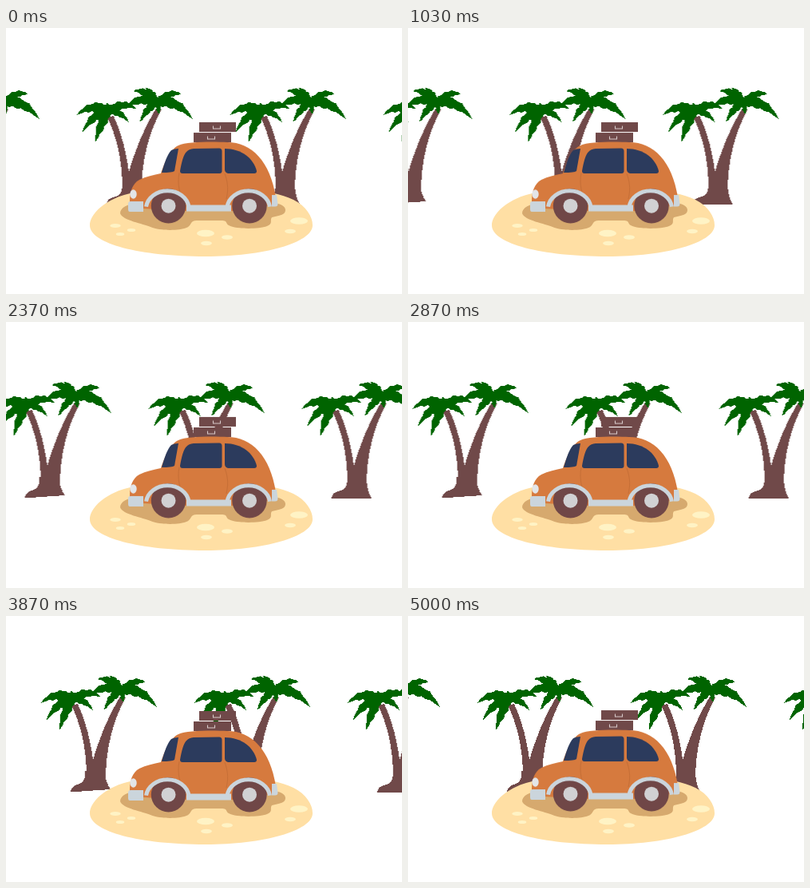
Recreate the animation shown at these times as an HTML page. Size 496 by 333 pixels, loop 5030 ms.

```html
<!DOCTYPE html>
<html lang="en">
<head>
<meta charset="utf-8">
<title>Beach trip</title>
<style>
  html, body { margin: 0; width: 100%; height: 100%; overflow: hidden; background: #fff; }
  svg { display: block; width: 496px; height: 333px; }
  .grove { animation: drift 5030ms linear infinite; shape-rendering: crispEdges; }
  .car { animation: bob 251.5ms cubic-bezier(.37, 0, .63, 1) infinite alternate; }
  .trunk, .case { fill: #704949; }
  .case { shape-rendering: crispEdges; }
  .leaf { fill: #006400; }
  .spot { fill: #fff3c5; }
  .glass { fill: #2c3b5d; }
  .trim { fill: #cbd5dc; }
  .arch { fill: none; stroke: #cbd5dc; stroke-width: 5; }
  .seam { fill: none; stroke: #c66f37; }
  .clasp { fill: none; stroke: #d8caca; stroke-width: 1.1; }
  @keyframes drift { to { transform: translateX(192px); } }
  @keyframes bob { to { transform: translateY(1.5px); } }
</style>
</head>
<body>
<svg viewBox="0 0 496 333">
  <defs>
    <g id="pair">
      <g class="trunk">
        <path d="M38 112C49 133 57 165 57 200H66V186C63 160 56 130 46 110Z"/>
        <path d="M99 101C84 125 72 155 63 187V206H81C81 165 90 132 106 102Z"/>
      </g>
      <path id="crowns" class="leaf"/>
    </g>
    <path id="base" class="trunk" d="M57 196C57 209 50 211 45 212Q38 214 37 220.500H87C83 213 81 205 81 192H64Z"/>
    <ellipse id="pebble" class="spot" rx="11" ry="4.300"/>
    <g id="wheel">
      <circle r="21.700" fill="#704747"/>
      <circle r="9" fill="#d1d1d3"/>
      <path class="arch" d="M-28 1A27 23 0 0 1 25.500 1"/>
    </g>
  </defs>

  <g class="grove" id="grove"></g>

  <path fill="#ffdfa4" d="M105 247C105 235 118 222 135 214C150 206 175 203 200 203H300C325 203 345 208 360 215C376 223 384 236 384 247C384 269 322 286 250 286C168 286 105 270 105 247Z"/>
  <path fill="#d6a96e" d="M143 232C143 225 152 220 166 219H335C346 220 350 224 350 228C350 234 342 235 333 237C330 241 335 245 327 248C316 252 288 252 279 247C274 244 279 241 268 241H240C229 241 234 247 226 250C216 254 193 254 181 249C172 245 146 241 143 232Z"/>
  <use href="#pebble" transform="translate(250 257)"/>
  <use href="#pebble" transform="translate(367 241.500)"/>
  <use href="#pebble" transform="translate(277 262) scale(.64)"/>
  <use href="#pebble" transform="translate(251 269.500) scale(.62)"/>
  <use href="#pebble" transform="translate(356 254.500) scale(.62)"/>
  <use href="#pebble" transform="translate(137 247.500) scale(.6)"/>
  <use href="#pebble" transform="translate(157 253) scale(.48)"/>
  <use href="#pebble" transform="translate(143 258) scale(.48)"/>

  <g class="car">
    <rect class="case" x="242" y="118" width="46" height="12"/>
    <rect class="case" x="235" y="131" width="47" height="12"/>
    <path class="clasp" d="M259.500 122.500V126H268.500V122.500M252.500 135.500V139H261.500V135.500"/>

    <path fill="#d67a3e" d="M155 218C155 205 158 195 167 190C175 186 185 184 194 182C199 168 205 152 216 147C226 142 260 142 277 143C308 143 331 167 338 212V223H326L284 229H226L172 226H155Z"/>
    <path class="seam" d="M217 181C214 196 218 210 224 217M274 182C279 196 278 204 276 214"/>
    <path class="glass" d="M195 181C198 170 202 158 207 153Q211 151 216 151L211 179Q208 181 195 181Z"/>
    <path class="glass" d="M218 179C220 168 222 159 226 155Q229 151.500 235 151L267 150.500Q270.500 150.500 270.500 154V179Q270.500 182 267.500 182H221Q218 182 218 179Z"/>
    <path class="glass" d="M274 151C295 151 310 163 314 179Q314 182 311 182H278Q274 181 274 177Z"/>

    <path class="trim" d="M226 221.500H282V229.500H226Z"/>
    <path class="trim" d="M156 217H172V230H155Q153 230 153 227V220Q153 217 156 217Z"/>
    <path class="trim" d="M333 209H339L340.500 220Q340.500 223.500 337 223.500H333Z"/>
    <ellipse cx="159.500" cy="208" rx="4.200" ry="5.800" fill="#e3e5e8"/>
    <use href="#wheel" x="203.500" y="222.700"/>
    <use href="#wheel" x="305" y="222.700"/>
  </g>
</svg>
<script>
  const TEETH = 8, GAP = 192;

  // A toothed leaf from the hub to a tip, arched upwards by its reach
  function frond(hub, dx, dy) {
    const bend = { x: dx * 0.55, y: dy / 2 - Math.abs(dx) / 3 };
    const width = 4 + Math.hypot(dx, dy) * 0.18;
    const edge = side => Array.from({ length: TEETH }, (_, i) => {
      const t = i / TEETH, u = 1 - t;
      const x = hub.x + 2 * u * t * bend.x + t * t * dx;
      const y = hub.y + 2 * u * t * bend.y + t * t * dy;
      const angle = Math.atan2(u * bend.y + t * (dy - bend.y), u * bend.x + t * (dx - bend.x));
      const tooth = i % 2 ? 1.15 : 0.8;
      const reach = side * width / 2 * tooth * Math.sin(Math.PI * (0.25 + 0.75 * t));
      return `${x - Math.sin(angle) * reach} ${y + Math.cos(angle) * reach}`;
    });
    const tip = `${hub.x + dx} ${hub.y + dy}`;
    return "M" + [...edge(1), tip, ...edge(-1).reverse()].join("L") + "Z";
  }

  const crown = (x, y, tips) => tips.map(([dx, dy]) => frond({ x, y }, dx, dy)).join("");

  document.getElementById("crowns").setAttribute("d",
    crown(39, 104, [[-39, 5], [-32, 26], [-16, 39], [-24, -6], [-1, -11], [26, 14], [35, -3]]) +
    crown(101, 93, [[-41, 8], [-22, 25], [-30, -14], [-15, -18], [30, -10], [44, 21], [2, 15]]));

  // Pairs stand one gap apart; those entering from the left stand on sloping ground
  document.getElementById("grove").innerHTML = [-2, -1, 0, 1, 2].map(i =>
    `<g transform="translate(${88 + GAP * i})"><use href="#pair"/>
     <use href="#base" transform="${i < 0 ? "rotate(-4 37 220)" : ""}"/></g>`).join("");
</script>
</body>
</html>
```
